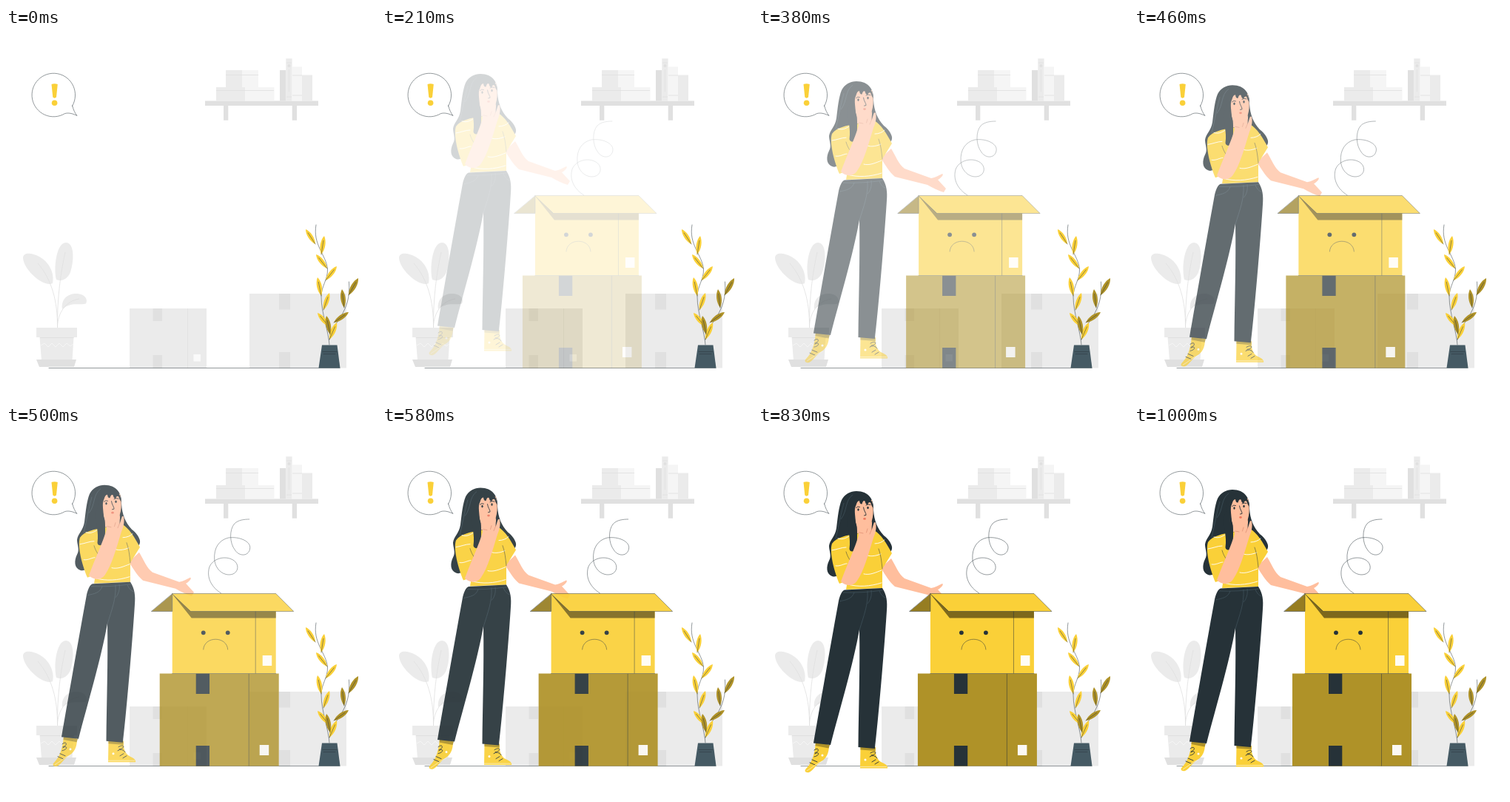
An HTML page that plays this animation: 500 by 500 pixels, repeating every 1.04 s.

```html
<!DOCTYPE html>
<html lang="en">
<head>
<meta charset="utf-8">
<title>Sad box</title>
<style>
html, body { margin: 0; width: 100%; height: 100%; overflow: hidden; background: #fff; }
svg { display: block; width: 100vw; height: 100vh; }
.line { fill: none; stroke: #263238; stroke-width: .5; stroke-linecap: round; stroke-linejoin: round; }
.bold { stroke-width: .9; }
.pale { fill: #ebebeb; }
.grey { fill: #e0e0e0; }
.light { fill: #f5f5f5; }
.vein { fill: none; stroke: #e0e0e0; stroke-width: .8; }
.yellow { fill: #fad038; }
.navy { fill: #263238; }
.skin { fill: #ffbe9d; }
.olive { fill: #af9228; }
.white { fill: none; stroke: #fff; stroke-width: .9; stroke-linecap: round; }
.seam { fill: none; stroke: #455a64; stroke-width: .6; }
.crease { fill: none; stroke: #d58369; stroke-width: .6; stroke-linecap: round; }
</style>
</head>
<body>
<svg viewBox="0 0 500 500">
  <g id="shelf">
    <path class="grey" d="M269 98.500H422V105H269ZM294 105h6.300v19.700h-6.300ZM386.700 105h6.300v19.700h-6.300Z"/>
    <path class="pale" d="M297 57h22v23h-22ZM284 80h39v18.500h-39Z"/>
    <path class="light" d="M319 57h22v23h-22ZM323 80h39.500v18.500h-39.500Z"/>
    <path class="vein" d="M297 63.500h44M284 84.500h78"/>
    <path class="grey" d="M370 57h8.500v41.500h-8.500Z"/>
    <path class="pale" d="M378.300 41.300h8.300v57.200h-8.300ZM400 63.500h14v35h-14Z"/>
    <path class="light" d="M386.500 52.300H400v46.200h-13.500Z"/>
    <path class="vein" d="M379 47h7M379 93h7M382.500 56v30M387 64h13M387 91h13"/>
    <circle class="grey" cx="382.500" cy="51" r="2"/>
  </g>

  <g id="bubble">
    <path class="line" d="M89.700 105.200C91 110 93 115 96 118.500C91 116 85 114 79.500 115.600A29.300 29.300 0 1 1 89.700 105.200Z"/>
    <path class="yellow" d="M61.500 76Q65.500 74.500 69.800 76L68 93.500Q65.600 95.800 63.300 93.500Z"/>
    <circle class="yellow" cx="65.600" cy="101.300" r="3.800"/>
  </g>

  <g id="pot-plant">
    <path class="pale" d="M63 345C51 351 24 327 23 311C23 302 36 304 45 309C58 316 66 331 63 345ZM68 340C64 325 68 290 81 290C93 290 92 316 87 330C83 340 74 343 68 340ZM76 380C74 366 84 358 97 359C107 360 111 367 108 372.500C98 375 88 370 76 380Z"/>
    <path class="vein" d="M69.500 405C70 370 62 340 43 318M69.500 405C69 365 74 330 80 303M69.500 403C70 386 80 369 99 366"/>
    <path class="pale" d="M41 405H96V418H41ZM45.500 418H91.500L89.500 449H48Z"/>
    <path class="grey" d="M41 448H95L92 458H45ZM46 418h45.500v1h-45.500Z"/>
    <path class="vein" style="stroke:#f8f8f8" d="M47 429l5-3 5 5 5-5 5 5 5-5 5 5 5-5 5 4 4-3"/>
  </g>

  <g id="back-boxes">
    <path class="pale" d="M167 379H271V459.500H167ZM329 359H460V459.500H329Z"/>
    <path class="grey" d="M198.500 379H211V396H198.500ZM198.500 442H211V459.500H198.500ZM369 359H384V380.500H369ZM369 438H384V459.500H369Z"/>
    <path class="vein" d="M245.500 379V459.500"/>
    <path fill="#fafafa" d="M253.500 441H263V450.500H253.500Z"/>
  </g>

  <path class="line" d="M58 459.500H451"/>

  <g id="vase">
    <path class="line" d="M437 428C436 410 426 385 426 363C426 349 435 340 434.500 326C433 307 414 293 419 266M437 421C441 395 467 387 463.500 343"/>
    <g id="leaves"></g>
    <path fill="#455a64" d="M427 428.500H447.500L451.500 459.500H422.500Z"/>
    <path class="line" d="M428 437.500H447M429 440.500H445"/>
  </g>

  <g id="woman">
    <path class="navy" d="M133 86C150 86 157 98 156 111C157 126 161 136 170 146C178 152 182 160 181 164C180 169 176 170 172 170L121 175C116 194 109 204 100 201C92 198 92 188 96 180C100 173 96 167 96 160C97 152 104 148 106 136C108 120 109 108 113 98C117 90 125 86 133 86Z"/>
    <path class="skin" d="M180 177C186 187 190 198 198 204L234 217C240 216 244 213 249 211C252 212 246 218 243 219L254 231L251 236C244 234 236 230 229 226L185 215C177 208 172 199 166 190Z"/>
    <path class="yellow" d="M131 144C120 146 106 148 100 157C96 168 103 195 110 211L121 207L119 219L168 217V191L181 170C174 157 166 144 157 139Z"/>
    <path class="white" d="M100 166C107 165 113 162 119 162M105 187C111 188 116 184 120 184M121 212C136 216 151 215 167 210M143 198C151 200 159 196 167 193M148 173C154 175 161 173 166 171M158 157C163 157 168 155 171 152M108 150C114 152 118 150 123 147"/>
    <path class="line" d="M119 168C121 175 124 179 127 183M163 164C166 172 167 181 168 191"/>
    <path class="yellow" d="M78 426L96 429C96 441 92 447 86 451C79 455 74 464 69 466C64 467 62 464 65 461C71 455 76 446 78 426ZM138.500 432H159C158 444 162 450 168 453C173 455 176 458 175 460.500H138Z"/>
    <path class="olive" d="M78 425L97 429L95.500 433.500L77.500 430ZM138.500 431L158.500 433V437L138.500 435.500Z"/>
    <path class="navy" d="M117 219.500L168 217C174 226 175 236 174 247C172 282 164 382 158 434L135.500 432C136 380 138 325 137 273C129 319 109 386 98 429L75 426.500C84 375 97 300 108.500 237C110 228 113 221 117 219.500Z"/>
    <path class="seam" d="M115 223Q140 224 169 220M110 235C119 233 127 232 130 223M148 221C149 240 143 254 137 274M153 220C154 227 152 234 148 238M164 221C166 226 169 229 172 230"/>
    <path class="skin" d="M133 122L153 120L154 131L146 142L134 143Z"/>
    <path class="skin" d="M131 98L154 98C157 112 156 124 151 132C146 138 138 139 134 134C130 126 130 115 131 98Z"/>
    <path class="navy" d="M126 112C120 96 138 88 148 93C154 97 156 105 155.500 109Q153.500 106 152 101.500Q149.500 100 148 104.500Q145.500 104 144.500 99.500Q142 98 140.500 103.500Q137.500 104 137 99Q134 99 132.500 105Q130 110 131 117L132 128C135 140 134 151 133.500 162C131 169 124 169 123.500 164C126 148 120 138 122 121Z"/>
    <path class="seam" d="M128 91C117 99 121 113 112 124M116 102C110 126 108 137 105 151"/>
    <path class="line bold" d="M132.500 108.500Q134.500 106 137.500 107.500M146 105Q149 103 152 104.500M142.500 108C143 113 146.500 116 146 118.500L143.500 119"/>
    <ellipse class="navy" cx="135.500" cy="111" rx="1.200" ry="1.800"/>
    <ellipse class="navy" cx="148.500" cy="108.500" rx="1.200" ry="1.800"/>
    <ellipse cx="144" cy="123.500" rx="1.800" ry="1.400" fill="#ed795f"/>
    <path class="skin" d="M112 208C118 215 129 215 134 207C143 194 149 172 156 149C160 140 160 133 159 129Q157 126.500 156 131L153.500 139L154 128.500Q152 125 150 130L148 138L146 132Q143.500 129 142.500 133L139 138Q135 141 136 146C131 163 121 184 112 208Z"/>
    <path class="crease" d="M148 137L146.500 142M153.500 138L151 144M137 142L142 143"/>
    <path class="line bold" d="M76 436C82 431 84 438 77 440M77 441C82 437 85 443 76 445M73 449L80 452M70 453L77 456M152 440C160 435 162 442 153 443M151 445Q157 441 161 447M154 452L159 449M158 455L163 452"/>
    <path fill="#fff" d="M85.500 443a1.500 1.500 0 1 0 3 0a1.500 1.500 0 1 0-3 0M143.500 449a1.500 1.500 0 1 0 3 0a1.500 1.500 0 1 0-3 0"/>
    <path class="white" d="M66 464C73 460 79 454 87 451M138 458.500H174" opacity=".6"/>
  </g>

  <g id="boxes">
    <path class="line" d="M297 226C284 218 277 205 281 191C285 180 300 175 311 180C321 184 322 196 313 200C302 204 289 195 288 180C287 165 294 154 307 151C322 149 337 156 336 165C335 176 322 177 316 168C308 158 308 140 315 132C320 127 328 126 335 126"/>
    <path class="olive" d="M214 334.500H375V459.500H214Z"/>
    <path class="navy" d="M263 334.500H281.300V362H263ZM263 432H281.300V459.500H263Z"/>
    <path class="line" d="M334.500 335V459"/>
    <path class="yellow" d="M231 227H371V334.500H231Z"/>
    <path fill="#7d681c" d="M231 227L257 259.500H371V250H256Z"/>
    <path class="line" style="fill:#967d22" d="M231 227V250.500H203Z"/>
    <path class="line" style="fill:#fad038" d="M231 226.500H371L395 250.500H256Z"/>
    <path class="line" d="M343.500 251V334M231 334.500H371"/>
    <path fill="#fff" opacity=".95" d="M353 310H365.500V324H353ZM349 431H361.500V445H349Z"/>
    <circle class="navy" cx="273" cy="279.300" r="2.900"/>
    <circle class="navy" cx="306" cy="279.300" r="2.900"/>
    <path class="line" d="M273 302C274 283.500 305 283.500 306 302"/>
  </g>
</svg>
<script>
const $ = id => document.getElementById(id);

function leaf(x, y, tipX, tipY, fill) {
  const dx = tipX - x, dy = tipY - y;
  const at = (along, side) => `${x + dx * along - dy * side} ${y + dy * along + dx * side}`;
  return `<path fill="${fill}" d="M${x} ${y}C${at(.3, .18)} ${at(.75, .17)} ${tipX} ${tipY}C${at(.75, -.17)} ${at(.3, -.18)} ${x} ${y}Z"/>
    <path class="line" d="M${x} ${y}L${at(.75, 0)}"/>`;
}

const bright = [
  [418, 292, 405, 272], [426, 306, 430, 281], [434, 325, 419, 306], [432, 341, 447, 322],
  [426, 362, 421, 337], [429, 381, 437, 358], [436, 403, 421, 385], [437, 421, 447, 398]
];
const dark = [[463, 361, 476, 338], [457, 378, 454, 353], [443, 398, 463, 384], [438, 414, 433, 389]];
$("leaves").innerHTML =
  bright.map(l => leaf(...l, "#fad038")).join("") + dark.map(l => leaf(...l, "#af9228")).join("");

const bezier = (s, a, b) => 3 * (1 - s) ** 2 * s * a + 3 * (1 - s) * s * s * b + s ** 3;

// Cubic-bezier easing with a small overshoot.
function ease(x) {
  if (x >= 1) return 1;
  let lo = 0, hi = 1;
  for (let i = 0; i < 24; i++) {
    const mid = (lo + hi) / 2;
    if (bezier(mid, .36, .5) < x) lo = mid; else hi = mid;
  }
  return bezier(lo, -.01, 1.38);
}

const LOOP = 1040, FPS = 24, TRAVEL = 30;

function render(ms) {
  const step = Math.floor((ms % LOOP + 4) * FPS / 1000);
  const progress = step < 2 ? 0 : ease(step / FPS + .025);
  const shift = TRAVEL * (progress - 1);
  const opacity = Math.max(0, Math.min(1, progress));
  $("woman").setAttribute("transform", `translate(0 ${shift})`);
  $("boxes").setAttribute("transform", `translate(${shift} 0)`);
  $("woman").setAttribute("opacity", opacity);
  $("boxes").setAttribute("opacity", opacity);
}

const start = performance.now();
function tick() {
  render(performance.now() - start);
  requestAnimationFrame(tick);
}
tick();
</script>
</body>
</html>
```
